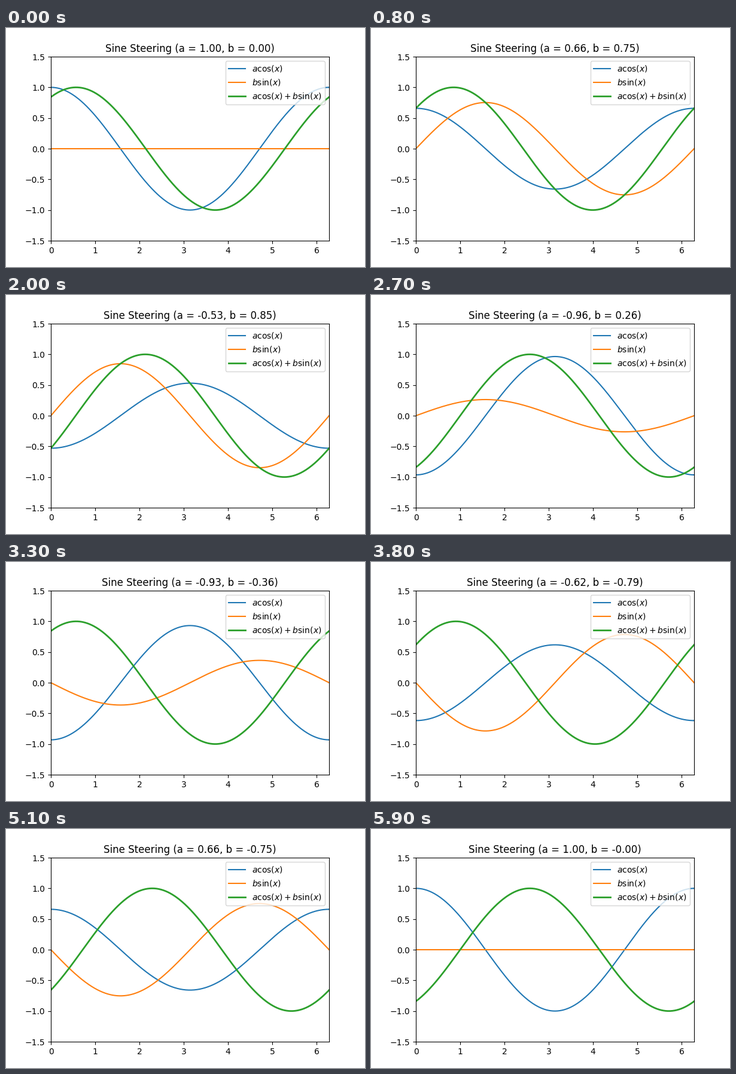
A matplotlib script that plays this animation: 600x400 px, repeating every 6 s.

```python
import numpy as np
import matplotlib.pyplot as plt
from matplotlib.animation import FuncAnimation

FRAMES = 60
INTERVAL = 100
PHASE_LIMIT = 1.0

x = np.linspace(0, 2 * np.pi, 500)
angles = np.linspace(0, 2 * np.pi, FRAMES)

fig, ax = plt.subplots(figsize=(6, 4), dpi=100)
ax.set_xlim(0, 2 * np.pi)
ax.set_ylim(-1.5, 1.5)

cos_line, = ax.plot([], [], label=r"$a\cos(x)$")
sin_line, = ax.plot([], [], label=r"$b\sin(x)$")
sum_line, = ax.plot([], [], lw=2, label=r"$a\cos(x) + b\sin(x)$")
title = ax.set_title("")
ax.legend(loc="upper right")


def limited_phase(a, b):
    """Phase of the combined wave, folded to a half turn and clamped."""
    phase = np.arctan2(a, b) if b >= 0 else np.arctan2(-a, -b)
    return np.clip(phase, -PHASE_LIMIT, PHASE_LIMIT)


def update(i):
    a, b = np.cos(angles[i]), np.sin(angles[i])
    cos_line.set_data(x, a * np.cos(x))
    sin_line.set_data(x, b * np.sin(x))
    sum_line.set_data(x, np.sin(x + limited_phase(a, b)))
    title.set_text(f"Sine Steering (a = {a:.2f}, b = {b:.2f})")
    return cos_line, sin_line, sum_line, title


anim = FuncAnimation(fig, update, frames=FRAMES, interval=INTERVAL,
                     repeat=True, repeat_delay=0, blit=False)
plt.show()
```
